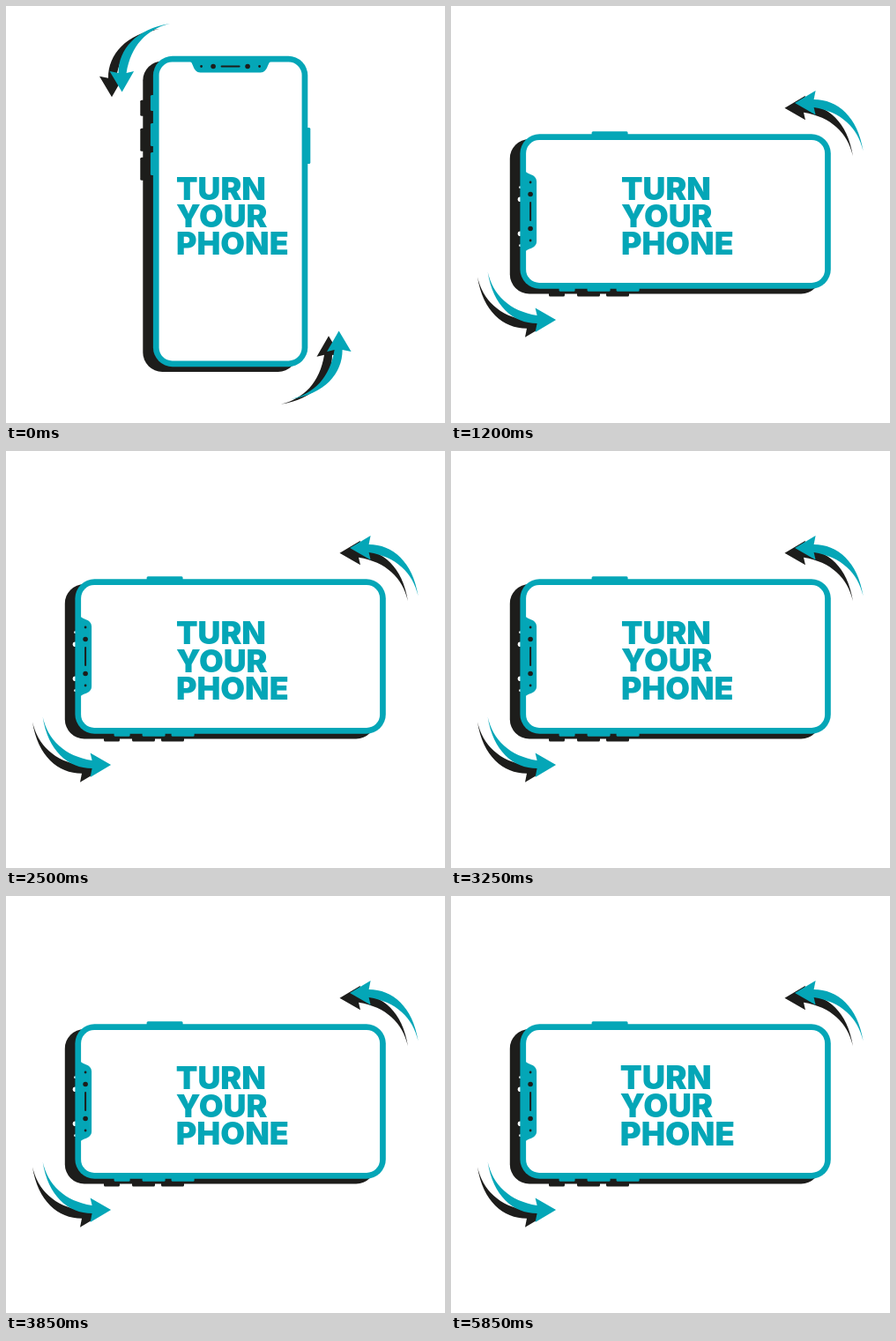
An HTML page that plays this animation: 498 by 473 pixels, repeating every 5900 ms.

```html
<!DOCTYPE html>
<html lang="en">
<head>
<meta charset="utf-8">
<title>Turn your phone</title>
<style>
  html, body { margin: 0; width: 100%; height: 100%; overflow: hidden; background: #fff; }
  svg { display: block; }
  text { font: 900 35.8px Inter, "Open Sans", sans-serif; fill: #04a6b7; }
  .shadow { color: #1d1d1b; --hole: #fff; }
  .front { color: #04a6b7; --hole: #1d1d1b; }
</style>
</head>
<body>
<svg width="498" height="473" viewBox="0 0 498 473">
  <defs>
    <path id="arrow" fill="currentColor"
      d="M123 135.5L137 159L127 157C127 184 107 207 68.5 213C95 207 113 188 118 157L109.5 159Z"/>
    <g id="body" fill="currentColor">
      <rect x="-87.7" y="-176.2" width="175.4" height="352.4" rx="22"/>
      <rect x="80" y="-95" width="10.7" height="41" rx="1.5"/>
      <rect x="-90.7" y="-132" width="11" height="18" rx="1.5"/>
      <rect x="-90.7" y="-100" width="11" height="26" rx="1.5"/>
      <rect x="-90.7" y="-67" width="11" height="26" rx="1.5"/>
      <use href="#arrow"/>
      <use href="#arrow" transform="rotate(180)"/>
    </g>
    <g id="dots" style="fill:var(--hole)">
      <circle cx="-33" cy="-164.5" r="1.4"/>
      <circle cx="-19.5" cy="-164.5" r="2.8"/>
      <circle cx="19.5" cy="-164.5" r="2.8"/>
      <circle cx="33" cy="-164.5" r="1.4"/>
    </g>
  </defs>

  <g transform="translate(243 238.7)">
    <g class="turn shadow">
      <use href="#body"/>
      <use href="#dots"/>
    </g>
  </g>
  <g transform="translate(254.6 233)">
    <g class="turn front">
      <use href="#body"/>
      <rect x="-81" y="-169.5" width="162" height="339" rx="15" fill="#fff"/>
      <path fill="currentColor" d="M-46-170C-42-170-43-157.5-34-157.5H34C43-157.5 42-170 46-170Z"/>
      <use href="#dots"/>
      <path d="M-10-164.5H10" stroke="#1d1d1b" stroke-width="2" stroke-linecap="round"/>
    </g>
  </g>

  <g id="words">
    <text x="193" y="219.5">TURN</text>
    <text x="193" y="250.5">YOUR</text>
    <text x="193" y="282">PHONE</text>
  </g>
</svg>
<script>
  const LOOP = 5900, STEP = 50, TURN = 350, RESTART = 3300, PULSE = 700;
  const layers = document.querySelectorAll('.turn');
  const words = document.getElementById('words');
  const clamp = v => Math.min(1, Math.max(0, v));
  const ease = p => p < .5 ? 2 * p * p : 1 - 2 * (1 - p) ** 2;

  function draw(now) {
    const t = Math.floor(now % LOOP / STEP) * STEP;
    const start = t < RESTART ? 350 : 3490;
    const turned = ease(clamp((t - start) / TURN));
    for (const layer of layers) layer.setAttribute('transform', `rotate(${-90 * turned})`);

    // the words swell briefly while the phone lies sideways
    const swell = turned === 1 ? .03 * Math.sin(Math.PI * (t - 1200) / PULSE) ** 4 : 0;
    words.setAttribute('transform', `translate(257 238) scale(${1 + swell}) translate(-257 -238)`);
  }

  const begin = performance.now();
  function frame() {
    draw(performance.now() - begin);
    requestAnimationFrame(frame);
  }
  frame();
</script>
</body>
</html>
```
